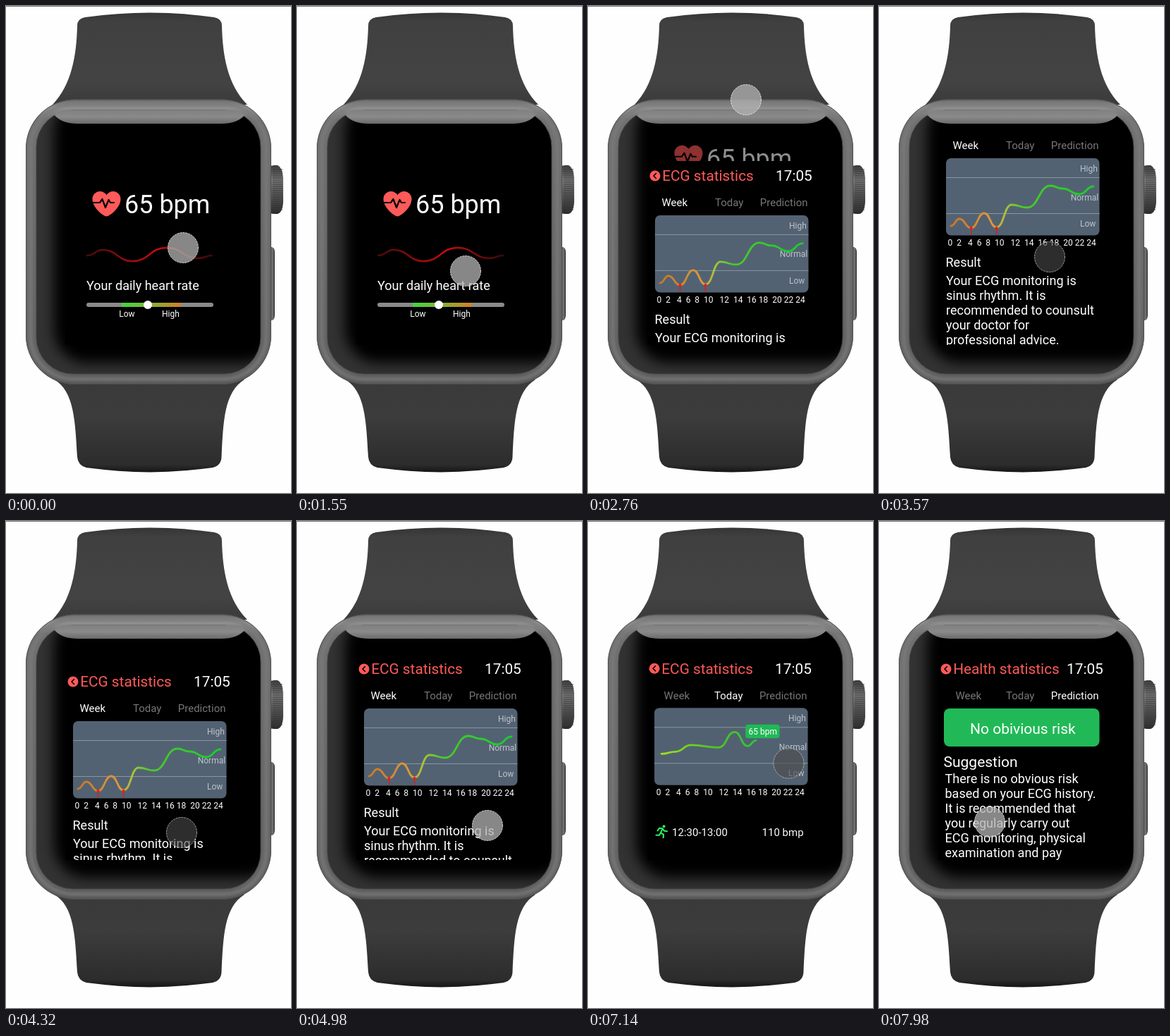
Animation of 404x691 px, one loop 8 s. Source, as an HTML page:

```html
<!DOCTYPE html>
<html lang="en">
<head>
<meta charset="utf-8">
<title>Watch heart rate</title>
<style>
html, body { margin: 0; width: 100%; height: 100%; overflow: hidden; background: #fefefe; }
svg { display: block; width: 404px; height: 691px; }
text { font-family: Roboto, Arial, sans-serif; }
</style>
</head>
<body>
<svg viewBox="0 0 404 691" xmlns="http://www.w3.org/2000/svg">
  <defs>
    <linearGradient id="strapTop" x1="0" y1="0" x2="0" y2="1">
      <stop offset="0" stop-color="#353535"/><stop offset=".1" stop-color="#404040"/>
      <stop offset=".75" stop-color="#434343"/><stop offset="1" stop-color="#3a3a3a"/>
    </linearGradient>
    <linearGradient id="strapLow" x1="0" y1="0" x2="0" y2="1">
      <stop offset="0" stop-color="#3a3a3a"/><stop offset=".4" stop-color="#3c3c3c"/>
      <stop offset=".92" stop-color="#2c2c2c"/><stop offset="1" stop-color="#151515"/>
    </linearGradient>
    <linearGradient id="metal" x1="0" y1="0" x2="0" y2="1">
      <stop offset="0" stop-color="#6a6a6a"/><stop offset=".03" stop-color="#909090"/>
      <stop offset=".07" stop-color="#707070"/><stop offset=".95" stop-color="#606060"/><stop offset="1" stop-color="#555"/>
    </linearGradient>
    <linearGradient id="shine" x1="0" y1="0" x2="0" y2="1">
      <stop offset="0" stop-color="#808080"/><stop offset=".5" stop-color="#8a8a8a"/><stop offset="1" stop-color="#6a6a6a"/>
    </linearGradient>
    <linearGradient id="knob" x1="0" y1="0" x2="0" y2="1">
      <stop offset="0" stop-color="#3a3a3a"/><stop offset=".3" stop-color="#777"/><stop offset="1" stop-color="#2b2b2b"/>
    </linearGradient>
    <linearGradient id="side">
      <stop offset="0" stop-color="#333"/><stop offset=".6" stop-color="#777"/><stop offset="1" stop-color="#303030"/>
    </linearGradient>
    <linearGradient id="pulse" gradientUnits="userSpaceOnUse" x1="114" x2="293" y1="0" y2="0">
      <stop offset="0" stop-color="#4a0a0a"/><stop offset=".55" stop-color="#c80d0d"/><stop offset="1" stop-color="#3c0808"/>
    </linearGradient>
    <linearGradient id="range">
      <stop offset="0" stop-color="#43d63f"/><stop offset=".45" stop-color="#7cb637"/><stop offset="1" stop-color="#d47f26"/>
    </linearGradient>
    <linearGradient id="week" gradientUnits="userSpaceOnUse" x1="102" x2="304" y1="0" y2="0">
      <stop offset="0" stop-color="#c9772a"/><stop offset=".3" stop-color="#dc9a3c"/>
      <stop offset=".38" stop-color="#a9c43a"/><stop offset=".5" stop-color="#4bca2c"/><stop offset="1" stop-color="#18cd2c"/>
    </linearGradient>
    <linearGradient id="today" gradientUnits="userSpaceOnUse" x1="105" x2="239" y1="0" y2="0">
      <stop offset="0" stop-color="#a2e01c"/><stop offset=".5" stop-color="#55c825"/><stop offset="1" stop-color="#2fc43a"/>
    </linearGradient>
    <filter id="soft"><feGaussianBlur stdDeviation="2"/></filter>
    <filter id="glow"><feGaussianBlur stdDeviation="9"/></filter>
    <clipPath id="glass"><rect x="43" y="148" width="318" height="374" rx="52"/></clipPath>
    <clipPath id="view"><rect x="84" y="189" width="236" height="292"/></clipPath>
  </defs>

  <rect width="404" height="1" fill="#777"/>
  <path fill="url(#strapTop)" d="M101 28Q101 18 112 16Q158 9.500 204 9.500Q250 9.500 295 16Q306 18 306 28C307 70 314 112 342 140H66C93 112 100 70 101 28Z"/>
  <path fill="url(#strapLow)" d="M68 530C97 546 98 590 101 640Q102 652 114 655Q160 661 204 661.500Q248 661 293 655Q305 652 305.500 640C308 590 309 548 338 530Z"/>

  <path fill="url(#side)" d="M373 342H377Q381 343 381 350V438Q381 445 377 446H373Z"/>
  <rect x="367" y="229" width="9" height="64" rx="3" fill="#4a4a4a"/>
  <path fill="url(#knob)" d="M370 236Q371 226 380 226H385Q392 229 393 244V278Q392 293 385 295H380Q371 295 370 285Z"/>
  <g id="ribs" stroke="#333" stroke-width=".8"></g>

  <rect x="28" y="132.500" width="348" height="404.500" rx="70" fill="url(#metal)"/>
  <rect x="35" y="139.500" width="334" height="390" rx="61" fill="none" stroke="#7c7c7c" stroke-width="4" filter="url(#soft)"/>
  <rect x="28.500" y="133" width="347" height="403.500" rx="69" fill="none" stroke="#505050"/>
  <g clip-path="url(#glass)">
    <rect x="43" y="148" width="318" height="374" fill="#323232"/>
    <rect x="68" y="130" width="315" height="376" rx="46" filter="url(#glow)"/>
  </g>
  <rect x="43" y="148" width="318" height="374" rx="52" fill="none" stroke="#444"/>
  <path fill="url(#shine)" d="M69 155Q73 147.500 86 147.500H321Q334 147.500 338 155Q328 167 305 167H102Q79 167 69 155Z"/>

  <g clip-path="url(#view)">
    <rect x="84" y="189" width="236" height="292"/>
    <g id="home"></g><g id="ecg"></g><g id="day"></g><g id="risk"></g>
  </g>
  <circle id="dot" r="21.500" stroke-dasharray="3 1"/>
</svg>

<script>
const $ = id => document.getElementById(id);
const RED = '#ff5a5a', GREEN = '#21b957', LIME = '#2cf05c', DIM = '#777', PALE = '#bcc2c9';

const text = (str, x, y, size, fill = '#fff') =>
  `<text x="${x}" y="${y}" font-size="${size}" fill="${fill}">${str}</text>`;
const box = (x, y, w, h, r, fill) =>
  `<rect x="${x}" y="${y}" width="${w}" height="${h}" rx="${r}" fill="${fill}"/>`;
const disc = (x, y, r, fill) => `<circle cx="${x}" cy="${y}" r="${r}" fill="${fill}"/>`;
const line = (d, stroke, width) =>
  `<path d="${d}" fill="none" stroke="${stroke}" stroke-width="${width}" stroke-linecap="round" stroke-linejoin="round"/>`;
const para = (lines, x, y) => lines.map((s, i) => text(s, x, y + 21 * i, 18)).join('');
const backdrop = box(84, 189, 236, 292, 0, '#000');

// Smooth curve with level tangents at every point
const curve = pts => pts.map(([x, y], i) => {
  if (!i) return `M${x} ${y}`;
  const [px, py] = pts[i - 1], mx = (px + x) / 2;
  return `C${mx} ${py} ${mx} ${y} ${x} ${y}`;
}).join('');

function header(title, active) {
  const tabs = [['Week', active ? 108.5 : 104.5], ['Today', 180], ['Prediction', 243.8]];
  return backdrop + disc(95, 210, 7.5, RED) + line('M96.5 206.5L93 210L96.5 213.5', '#000', 1.6) +
    text(title, 105.2, 217.4, 20.8, RED) + text('17:05', 266, 217.4, 20.8) +
    tabs.map(([s, x], i) => text(s, x, 253.3, 15, i === active ? '#fff' : DIM)).join('');
}

function chart() {
  const hours = '0  2   4  6  8  10   12  14  16 18  20 22 24'.replace(/ /g, '\u00a0');
  const rule = y => box(95, y, 217.5, 1, 0, '#8797a3');
  return box(95, 266, 217.5, 109.5, 7, '#536272') + rule(293) + rule(344) +
    text('High', 285, 285, 12, PALE) + text('Normal', 271.7, 325.5, 12, PALE) + text('Low', 285, 363, 12, PALE) +
    text(hours, 97.6, 390, 12);
}

const drop = x => box(x - .6, 365, 1.3, 10, 0, '#e01818') + disc(x, 365, 2, '#f01818');

$('home').innerHTML = backdrop +
  `<path fill="${RED}" d="M142.5 298.5C138 298.5 122.5 286 122.5 274C122.5 267 128 263 133 263C137 263 140.5 265 142.5 268C144.5 265 148 263 152 263C157 263 162.500 267 162.500 274C162.500 286 147 298.5 142.5 298.5Z"/>` +
  line('M124 279H133L136.5 274L141 286L145.5 275L148 279H153', '#000', 2.2) +
  text('65 bpm', 168, 294, 36) +
  line(curve([[115, 354], [137, 346], [179, 362], [228, 343], [273, 358], [292, 354]]), 'url(#pulse)', 2.5) +
  text('Your daily heart rate', 114, 403, 18) +
  box(114, 421, 180, 6, 3, '#8a8a8a') + box(164, 421, 84, 6, 0, 'url(#range)') + disc(201, 424, 6, '#fff') +
  text('Low', 160.3, 440.5, 12) + text('High', 221, 440.5, 12);

$('ecg').innerHTML = header('ECG statistics', 0) + chart() +
  line(curve([[102, 362], [114, 352], [130.5, 365], [149, 344], [166.5, 364], [188, 332], [210, 336],
    [243, 305], [260, 309], [284, 317], [304, 306]]), 'url(#week)', 2.8) +
  drop(130.5) + drop(166.5) +
  text('Result', 94.5, 420.4, 18) +
  para(['Your ECG monitoring is', 'sinus rhythm. It is', 'recommended to counsult', 'your doctor for', 'professional advice.'], 95, 446);

$('day').innerHTML = header('ECG statistics', 1) + chart() +
  line(curve([[105, 331], [125, 328], [147, 318.5], [186, 322], [209, 300], [227, 320], [239, 312]]), 'url(#today)', 2.8) +
  box(224, 289.5, 48.5, 19.5, 4, GREEN) + text('65 bpm', 228.5, 303.5, 12) + disc(108.5, 434, 2, LIME) +
  line('M106.5 437L104 443L108 445.5L107.5 450M104 443L102 446.5H97.5M99.5 440L102 436.5L106.5 437L109 440.5L113 441', LIME, 2.1) +
  text('12:30-13:00', 120, 447.5, 15) + text('110 bmp', 247.5, 447.5, 15);

$('risk').innerHTML = header('Health statistics', 2) +
  box(92, 266, 220.5, 54, 8, GREEN) + text('No obivious risk', 129, 301.5, 21) +
  text('Suggestion', 91.5, 348.5, 21) +
  para(['There is no obvious risk', 'based on your ECG history.', 'It is recommended that', 'you regularly carry out',
    'ECG monitoring, physical', 'examination and pay'], 93.5, 372.3);

$('ribs').innerHTML = Array.from({ length: 20 }, (_, i) => `<path d="M378 ${232 + 3 * i}H392"/>`).join('');

const LOOP = 8000, STEP = 136.5, PHASE = 18;

// Pointer moves: start, end, then the place reached
const moves = [
  [120, 520, 242, 349], [1380, 1510, 239, 376], [2380, 2740, 224, 133], [2800, 3150, 238, 406],
  [3200, 3560, 242, 356], [3700, 4240, 249, 442], [4440, 4860, 270, 432], [5080, 5880, 0, 418],
  [5940, 6870, 287, 343], [7080, 7690, 35, 405], [7690, 7930, 157, 427]];
const presses = [[2380, 2740], [3200, 4440], [5080, 5800], [7080, 7690]];

function ease(t, a, b) {
  const f = Math.min(1, Math.max(0, (t - a) / (b - a)));
  return f * f * (3 - 2 * f);
}

function pointer(t) {
  let x = 251, y = 343;
  for (const [a, b, nx, ny] of moves) {
    const f = ease(t, a, b);
    x += (nx - x) * f;
    y += (ny - y) * f;
  }
  return [x, y];
}

// Content follows the drag, at half speed past its top, and springs back on release
function scrollAt(t, y) {
  if (t < 3200) return 0;
  const drag = 406 - (t < 4440 ? y : 442);
  return (drag < 0 ? drag / 2 : drag) * (1 - ease(t, 4440, 4580));
}

function place(id, x, y, shown, fade) {
  const el = $(id);
  el.setAttribute('transform', `translate(${x} ${y})`);
  el.setAttribute('opacity', 1 - fade / 2);
  el.style.display = shown ? '' : 'none';
}

function draw(now) {
  const t = Math.max(0, PHASE + STEP * Math.floor((now % LOOP - PHASE) / STEP));
  const [x, y] = pointer(t);
  const up = .894 * ease(t, 2380, 2740) + .106 * ease(t, 2760, 2880);
  const day = ease(t, 5080, 5780), risk = ease(t, 7080, 7820);

  // The old screen drifts a quarter of the way while the new one covers it
  place('home', 0, -73 * up, up < 1, up);
  place('ecg', -59 * day, 292 * (1 - up) - scrollAt(t, y), up > 0 && day < 1, day);
  place('day', 236 * (1 - day) - 59 * risk - .5, -.7, day > 0 && risk < 1, risk);
  place('risk', 236 * (1 - risk), 0, risk > 0, 0);

  const down = presses.some(([a, b]) => t >= a && t < b), dot = $('dot');
  dot.setAttribute('transform', `translate(${x} ${y})`);
  dot.setAttribute('fill', down ? 'rgba(75,75,75,.6)' : 'rgba(178,178,178,.76)');
  dot.setAttribute('stroke', down ? 'rgba(190,190,190,.8)' : 'rgba(235,235,235,.85)');
}

const start = performance.now();
function tick() {
  draw(performance.now() - start);
  requestAnimationFrame(tick);
}
tick();
</script>
</body>
</html>
```
